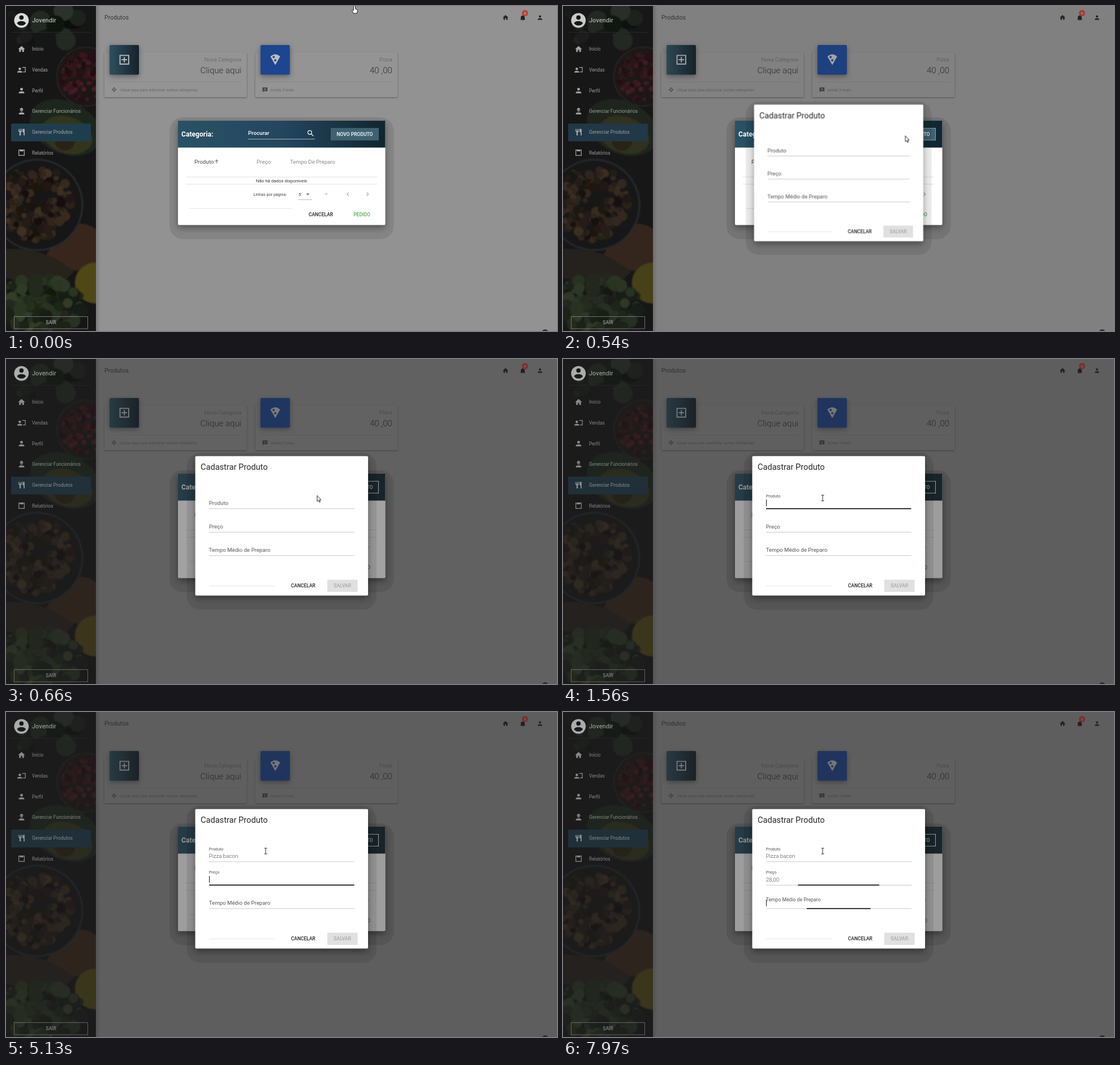
An HTML page for the animation above (8000 ms loop, 974 by 575 pixels).

```html
<!DOCTYPE html>
<html lang="pt-BR">
<head>
<meta charset="utf-8">
<title>Produtos</title>
<style>
  html, body { margin: 0; width: 100%; height: 100%; overflow: hidden; background: #929292; }
  svg { display: block; width: 974px; height: 575px; font-family: Roboto, Arial, sans-serif; }
  .focus-line { transform-box: fill-box; transform-origin: center; }
  #form { transform-origin: 487.3px 295.2px; }
  .dialog { filter: drop-shadow(0 5px 6px rgba(0,0,0,.38)); }
  .card { filter: drop-shadow(0 1px 1px rgba(0,0,0,.4)); }
  .tile { filter: drop-shadow(0 3px 5px rgba(0,0,0,.35)); }
  .icon .line { fill: none; stroke: currentColor; stroke-width: 2; }
  .icon .hole { fill: #15181a; }
</style>
</head>
<body>
<svg id="stage" viewBox="0 0 974 575"></svg>
<script>
const LOOP = 8000;
const stage = document.getElementById('stage');

const text = (x, y, str, size, fill, attrs = '') =>
  `<text x="${x}" y="${y + size * .36}" font-size="${size}" fill="${fill}" ${attrs}>${str}</text>`;
const rect = (x, y, w, h, fill, attrs = '') =>
  `<rect x="${x}" y="${y}" width="${w}" height="${h}" fill="${fill}" ${attrs}/>`;
const rule = (x1, x2, y, color) => rect(x1, y - .4, x2 - x1, .8, color);
const circle = (x, y, r, fill, attrs = '') => `<circle cx="${x}" cy="${y}" r="${r}" fill="${fill}" ${attrs}/>`;
const shape = (d, attrs = '') => `<path d="${d}" ${attrs}/>`;
const stroke = d => shape(d, 'class="line"');
const dot = (x, y, r, attrs = '') => circle(x, y, r, 'inherit', attrs);
const gradient = (id, ...colors) => `<linearGradient id="${id}">${colors.map((color, i) =>
  `<stop offset="${i / (colors.length - 1)}" stop-color="${color}"/>`).join('')}</linearGradient>`;
const LIGHT = 'font-weight="300"', MEDIUM = 'font-weight="500"';
const RIGHT = 'text-anchor="end"', CENTER = 'text-anchor="middle"';

// Icons live on a 24 unit grid.
const person = '<circle cx="12" cy="8" r="4"/>' + shape('M4 20v-2c0-5 16-5 16 0v2z');
const plusSign = stroke('M12 7v10M7 12h10');
const ICONS = {
  user: person,
  home: shape('M12 3L2 12h3v8h5v-6h4v6h5v-8h3z'),
  bell: shape('M3 20l2-3v-6c0-9 14-9 14 0v6l2 3zM10 21h4l-2 2z'),
  avatar: '<circle cx="12" cy="12" r="10"/><g class="hole"><circle cx="12" cy="8" r="3"/>' +
    shape('M6 16c1-4 11-4 12 0c-3 4-9 4-12 0z') + '</g>',
  sales: `<g transform="translate(-4 2) scale(.9)">${person}</g>` + stroke('M14 5h9v13h-7'),
  worker: shape('M4 21v-2c0-5 16-5 16 0v2zM7 8h10c0-8-10-8-10 0zM8 9h8c0 5-8 5-8 0z'),
  cutlery: shape('M3 3h2v6h2V3h2v6h2V3h2v7l-3 3v9H6v-9l-3-3zM15 3h6v19h-3v-9h-3z'),
  clipboard: stroke('M4 4h16v16H4z') + shape('M7 3h10v5H7z'),
  plusBox: stroke('M4 4h16v16H4z') + plusSign,
  pizza: shape('M3 6q9-8 18 0l-9 16zM7 7a2 2 0 0 0 4 0a2 2 0 0 0-4 0M10 13a2 2 0 0 0 4 0a2 2 0 0 0-4 0', 'fill-rule="evenodd"'),
  search: stroke('M4 9.5a5.5 5.5 0 0 1 11 0a5.5 5.5 0 0 1-11 0M14 14l6 6'),
  plus: stroke('M10 4h4v6h6v4h-6v6h-4v-6H4v-4h6z'),
  note: shape('M2 3h20v15H7l-5 4zM11 6v3H8v2h3v3h2v-3h3V9h-3V6z', 'fill-rule="evenodd"'),
  up: stroke('M12 20V5M5 12l7-7 7 7'),
  down: shape('M7 10l5 5 5-5z'),
  prev: stroke('M15 7l-5 5 5 5'),
  next: stroke('M9 7l5 5-5 5')
};
const icon = (name, x, y, size, color) =>
  `<g class="icon" color="${color}" fill="${color}" transform="translate(${x - size / 2} ${y - size / 2}) scale(${size / 24})">${ICONS[name]}</g>`;

let seed = 11;
const random = () => (seed = seed * 16807 % 2147483647) / 2147483647;

function scatter(count, cx, cy, rx, ry, size, hue, sat, dark) {
  return Array.from({ length: count }, () => {
    const angle = random() * 2 * Math.PI, dist = Math.sqrt(random());
    return circle(cx + Math.cos(angle) * dist * rx, cy + Math.sin(angle) * dist * ry,
      size * (.5 + random() * .8), `hsl(${hue} ${sat}% ${dark + random() * 13}%)`);
  }).join('');
}

const photo = `<g clip-path="url(#side)"><g filter="url(#soft)">
  ${rect(-9, -9, 180, 600, '#151716')}
  ${scatter(20, 70, 30, 80, 40, 14, 120, 10, 5)}
  ${circle(142, 125, 52, '#1e1517', 'stroke="#2a2627" stroke-width="2"')}
  ${scatter(130, 142, 125, 44, 42, 4, 350, 42, 8)}
  <ellipse cx="105" cy="215" rx="66" ry="46" fill="#1f271a" transform="rotate(25 105 215)"/>
  <ellipse cx="108" cy="228" rx="46" ry="32" fill="#33361f" transform="rotate(20 108 228)"/>
  ${circle(104, 238, 18, '#2a2119')}
  ${shape('M92 405Q130 368 165 400V462Q110 478 66 450Z', 'fill="#38281d"')}
  ${circle(55, 352, 80, '#171614', 'stroke="#252b2e" stroke-width="3"')}
  ${scatter(170, 52, 347, 66, 66, 7, 30, 28, 6)}
  ${shape('M-5 430Q70 425 120 470L90 500-5 480Z', 'fill="#27201a"')}
  ${circle(158, 490, 36, '#504619')}
  ${scatter(130, 60, 530, 78, 48, 10, 95, 20, 8)}
  </g></g>`;

const MENU = { home: 'Início', sales: 'Vendas', user: 'Perfil', worker: 'Gerenciar Funcionários',
  cutlery: 'Gerenciar Produtos', clipboard: 'Relatórios' };

const sidebarText = `<g id="side-text">
  ${icon('avatar', 27.3, 25.5, 31, '#dcdcdc')}
  ${text(46, 25.5, 'Jovendir', 11, '#b4b4b4', MEDIUM)}
  ${Object.entries(MENU).map(([name, label], i) => {
    const y = 76.3 + i * 36.65;
    return icon(name, 27.5, y, 14.5, '#b0b0b0') + text(46, y, label, 8.4, '#a8a8a8');
  }).join('')}
  ${rect(14.5, 549.5, 130, 21.5, 'none', 'stroke="#919191" stroke-width=".8"')}
  ${text(79.5, 560.3, 'SAIR', 8.5, '#a0a0a0', MEDIUM + CENTER)}</g>`;

const card = (x, fill, name, title, value, footIcon, foot) => `
  ${rect(x, 82, 252, 79.5, '#949494', 'rx="2" class="card"')}
  ${rect(x + 9.3, 69, 52, 52.5, fill, 'rx="2" class="tile"')}
  ${icon(name, x + 35.5, 95, 23, '#bdbdbd')}
  ${text(x + 242.3, 94.3, title, 9.7, '#595959', LIGHT + RIGHT)}
  ${text(x + 242.3, 113.5, value, 15, '#303030', LIGHT + RIGHT)}
  ${rule(x + 9, x + 242, 134.5, '#858585')}
  ${icon(footIcon, x + 17.3, 148, 10.5, '#484848')}
  ${text(x + 27.5, 148.3, foot, 7.2, '#555', LIGHT)}`;

const page = `
  ${rect(0, 0, 974, 575, '#929292')}
  ${rect(159, 0, 8, 575, 'url(#edge)')}
  ${text(174, 20.5, 'Produtos', 10.6, '#3a3a3a')}
  ${['home', 'bell', 'user'].map((name, i) => icon(name, 883 + i * 30.5, 20.5, 12, '#222')).join('')}
  ${circle(917.5, 12.5, 5.5, '#bf4037')}${text(917.5, 12.6, '0', 6, '#ddd', CENTER)}
  ${card(173.7, 'url(#teal)', 'plusBox', 'Nova Categoria', 'Clique aqui', 'plus', 'clique aqui para adicionar outras categorias')}
  ${card(440.5, '#1d4690', 'pizza', 'Pizza', '40 ,00', 'note', 'borda 3 reais')}
  ${circle(953, 578, 6, '#333')}
  ${photo}
  ${rule(9, 150, 46.5, '#2c3032')}
  ${rect(9, 208, 141, 31.5, '#203d4e', 'rx="2"')}`;

const dialog = (x, y, w, h) =>
  rect(x - 15, y - 6, w + 30, h + 31, '#000', 'rx="24" opacity=".09"') +
  rect(x, y, w, h, '#fff', 'rx="2" class="dialog"');
const button = (x, y, label, color) => text(x, y, label, 8.5, color, MEDIUM + CENTER);

const list = `
  ${dialog(304, 203, 366.5, 184.5)}
  ${rect(304, 203, 366.5, 47.5, 'url(#bar)')}
  ${text(310, 226.3, 'Categoria:', 12.1, '#fff', 'font-weight="700"')}
  ${text(428, 225, 'Procurar', 9.7, '#fff', MEDIUM)}
  ${rule(428, 546, 235.4, '#c6d0d6')}${icon('search', 538.5, 225.3, 14.5, '#fff')}
  ${rect(574, 215.8, 85, 22, '#3f6271', 'id="hover"')}
  ${rect(574.5, 216.3, 84, 21, 'none', 'id="outline" stroke="#fff"')}
  ${button(616.5, 226.5, 'NOVO PRODUTO', '#fff')}
  ${text(333, 275.2, 'Produto', 9.7, '#444')}${icon('up', 372.3, 275, 10, '#333')}
  ${text(443, 275.2, 'Preço', 9.7, '#8a8a8a')}${text(502, 275.2, 'Tempo De Preparo', 9.7, '#8a8a8a')}
  ${rule(318, 656, 302.5, '#ddd')}${rule(318, 656, 315.2, '#ddd')}
  ${text(487, 309, 'Não há dados disponíveis', 7.9, '#333', CENTER)}
  ${text(437.5, 333, 'Linhas por página:', 7.2, '#444')}${text(517, 333, '5', 7.5, '#333')}
  ${icon('down', 533.5, 333, 14.5, '#666')}${rule(517, 541, 342.7, '#aaa')}
  ${text(566.3, 332.5, '–', 7.5, '#333', CENTER)}
  ${icon('prev', 604, 333, 14.5, '#aaa')}${icon('next', 639.5, 333, 14.5, '#aaa')}
  ${rule(323.5, 506, 358.2, '#ddd')}
  ${button(556.5, 368.7, 'CANCELAR', '#222')}${button(629, 368.7, 'PEDIDO', '#4caf50')}
  ${rect(304, 203, 366.5, 184.5, '#212121', 'id="shade" rx="2"')}`;

// Each burst of typing runs evenly from its first to its last key.
const FIELDS = [
  { label: 'Produto', focus: 1090, blur: 4040, bursts: [['Pizza\u00a0', 2120, 2850], ['bacon', 3250, 3770]] },
  { label: 'Preço', focus: 4040, blur: 7920, bursts: [['28', 5310, 5560], [',00', 6580, 7100]] },
  { label: 'Tempo Médio de Preparo', focus: 7920, blur: LOOP, bursts: [] }
];

const fieldMarkup = ({ label, bursts }, i) => {
  const y = 254.6 + i * 41.5;
  const chars = bursts.flatMap(([word]) => [...word]).map(c => `<tspan>${c}</tspan>`).join('');
  return `<g class="field">${rule(359, 616, y + 10.2, '#bbb')}
    ${rect(359, y + 9.3, 256.5, 1.7, '#111', 'class="focus-line"')}
    <g transform="translate(358.7 ${y + 3.5})"><text class="label" font-size="9.7" fill="#555">${label}</text></g>
    ${text(358.7, y, chars, 9.7, '#444', LIGHT + ' class="value"')}
    ${rect(359, y - 6, 1, 12, '#111', 'class="caret"')}</g>`;
};

const form = `<g id="form">
  ${dialog(334.5, 171.8, 305.5, 246.8)}
  ${text(344, 191.2, 'Cadastrar Produto', 14.6, '#262626')}
  ${FIELDS.map(fieldMarkup).join('')}
  ${rule(359, 475.5, 401.3, '#ddd')}
  ${rect(568, 390.5, 53.5, 21.5, '#e0e0e0', 'rx="1"')}
  ${button(525.3, 401, 'CANCELAR', '#222')}${button(594.7, 401, 'SALVAR', '#a8a8a8')}</g>`;

const cursor = `<g id="cursor" stroke="#111" stroke-width=".9" fill="#fff">
  ${shape('M-1.5 1a1.5 1.5 0 0 1 3 0v4l4 2-1 6h-6l-3-5 1-1 2 1z', 'id="hand"')}
  ${shape('M0 0v10.5l2.5-2 1.5 3.5 1.5-.7-1.5-3.5h3z', 'id="arrow"')}
  ${shape('M-2.5-5h5M0-5V5M-2.5 5h5', 'id="beam"')}</g>`;

stage.innerHTML = `<defs>
  <clipPath id="side">${rect(0, 0, 159, 575, '#000')}</clipPath>
  <filter id="soft" x="-.1" y="-.1" width="1.2" height="1.2"><feGaussianBlur stdDeviation="1.2"/></filter>
  ${gradient('edge', '#7c7c7c', '#929292')}
  ${gradient('teal', '#2f4f5e', '#14232c')}
  ${gradient('bar', '#295265', '#24465e', '#10262f')}
  </defs>${page}${rect(0, 0, 974, 575, '#212121', 'id="scrim"')}${sidebarText}${list}${form}${cursor}`;

const EASE = 'cubic-bezier(.25,.8,.5,1)';
const OPEN = 'cubic-bezier(.25,.8,.25,1)';
const DIM = 'cubic-bezier(.25,.4,.5,1)';
const GLIDE = 'cubic-bezier(.3,.1,.3,1)';
const start = document.timeline.currentTime || 0;
const byId = id => document.getElementById(id);

// steps: [time in ms, value, easing towards the next step]
function play(el, prop, steps, easing = 'linear') {
  const frames = steps.map(([time, value, ease = easing]) => ({ offset: time / LOOP, [prop]: value, easing: ease }));
  if (steps[0][0] > 0) frames.unshift({ offset: 0, [prop]: steps[0][1] });
  frames.push({ offset: 1, [prop]: steps[steps.length - 1][1] });
  el.animate(frames, { duration: LOOP, iterations: Infinity }).startTime = start;
}
const hold = (el, prop, steps) => play(el, prop, steps, 'step-end');
const tween = (id, prop, from, to, begin, end, ease) =>
  play(byId(id), prop, [[begin, from, ease], [end, to]]);

// A 300 ms transition; one cut off by the loop end stops part-way.
const ramp = (at, from, to, css) => at + 300 <= LOOP
  ? [[at, css(from), EASE], [at + 300, css(to)]]
  : [[at, css(from)], [at + 50, css(from + (to - from) * .44)]];

tween('form', 'transform', 'scale(.5)', 'scale(1)', 370, 670, OPEN);
tween('form', 'opacity', 0, 1, 370, 520, OPEN);
tween('scrim', 'opacity', 0, .46, 495, 720, DIM);
tween('side-text', 'opacity', 1, .75, 495, 720, DIM);
tween('shade', 'opacity', 0, .44, 570, 690, DIM);
tween('hover', 'opacity', 1, 0, 570, 690, DIM);
tween('outline', 'opacity', 0, 1, 495, 690, DIM);

tween('cursor', 'transform', 'translateX(616px)', 'translateX(459px)', 480, 1100, GLIDE);
tween('cursor', 'translate', '0px 229.5px', '0px 246px', 545, 705, 'linear');
hold(byId('hand'), 'opacity', [[0, 1], [400, 0]]);
hold(byId('arrow'), 'opacity', [[0, 0], [400, 1], [750, 0]]);
hold(byId('beam'), 'opacity', [[0, 0], [750, 1]]);

// The caret shows on every event, then blinks until the next one.
function blink(events, end) {
  const steps = events.flatMap((at, i) => [[at, 1], [at + 530, 0], [at + 1060, 1]]
    .filter(([time]) => time < (events[i + 1] ?? end)));
  return [[0, 0], ...steps, [end, 0]];
}

document.querySelectorAll('.field').forEach((el, i) => {
  const { focus, blur, bursts } = FIELDS[i];
  const find = name => el.querySelector('.' + name);
  const grow = p => `scaleX(${p})`;
  const lift = p => `translateY(${-13.4 * p}px) scale(${1 - .25 * p})`;
  const keys = bursts.flatMap(([word, from, to]) =>
    [...word].map((_, n) => from + (to - from) * n / (word.length - 1)));

  play(find('focus-line'), 'transform', [...ramp(focus, 0, 1, grow), ...(blur < LOOP ? ramp(blur, 1, 0, grow) : [])]);
  play(find('label'), 'transform', ramp(focus, 0, 1, lift));
  hold(find('caret'), 'opacity', blink([focus, ...keys], blur));

  const value = find('value');
  [...value.children].forEach((char, n) => hold(char, 'fillOpacity', [[0, 0], [keys[n], 1]]));
  hold(find('caret'), 'transform', [[0, 'translateX(0px)'],
    ...keys.map((time, n) => [time, `translateX(${value.getSubStringLength(0, n + 1)}px)`])]);
});
</script>
</body>
</html>
```
